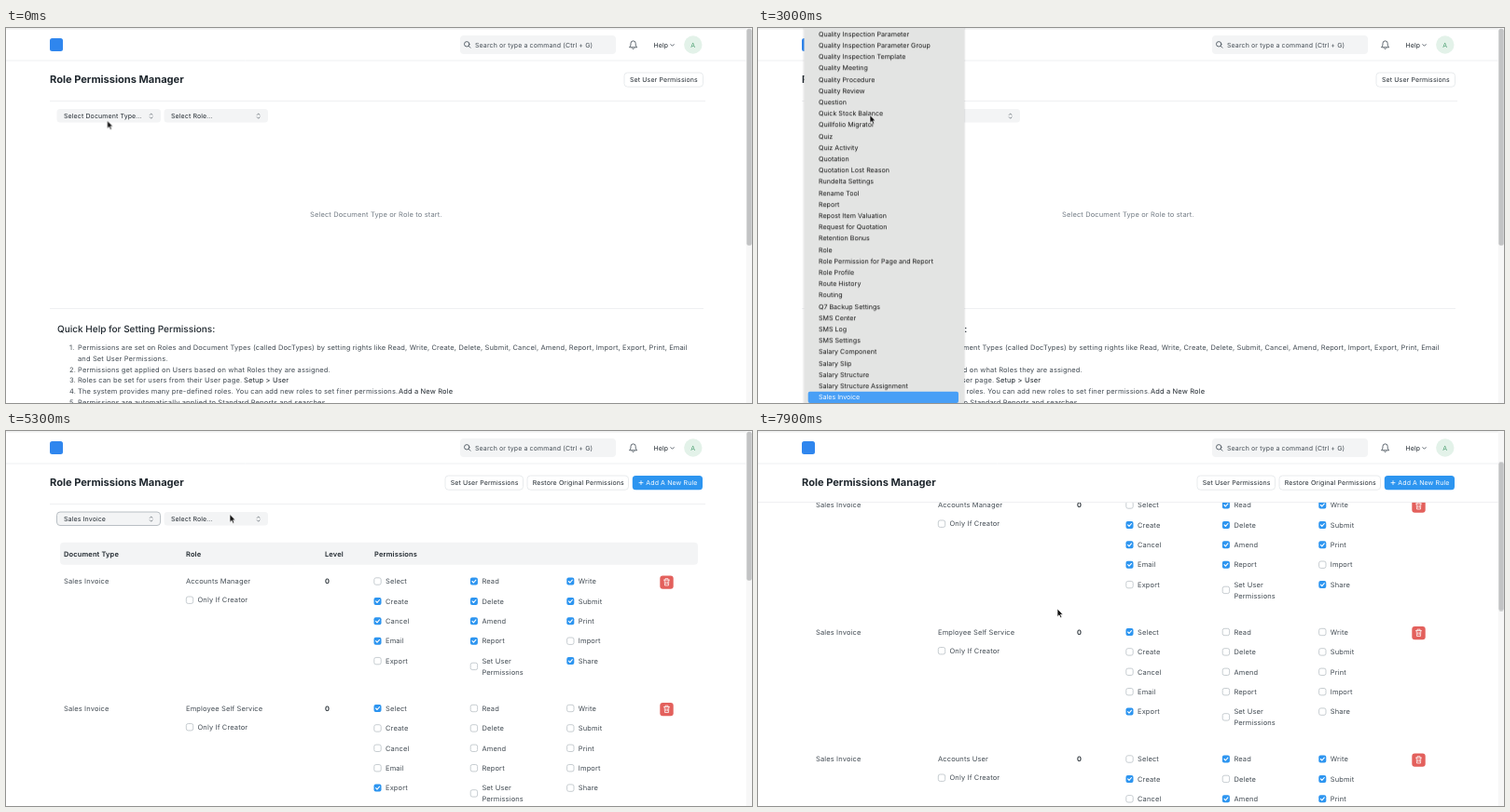
These frames come from a looping animation (800x403 px, 8000 ms). An HTML page:

```html
<!DOCTYPE html>
<html lang="en">
<head>
<meta charset="utf-8">
<title>Role Permissions Manager</title>
<style>
html, body { margin: 0; width: 100%; height: 100%; overflow: hidden; background: #fff; }
svg { display: block; width: 100vw; height: 100vh; }
text { font: 400 7.48px Inter, sans-serif; letter-spacing: .02em; fill: #424b53; text-rendering: geometricPrecision; white-space: pre; }
text.s { font-size: 6.96px; }
text.m { font-size: 7.11px; letter-spacing: 0; fill: #141414; }
text.dark { fill: #1f272e; }
text.bold { font-weight: 600; fill: #1f272e; }
text.title { font-size: 11.09px; font-weight: 700; letter-spacing: 0; fill: #1f272e; }
text.head { font-size: 10.03px; font-weight: 500; letter-spacing: 0; fill: #1f272e; }
text.soft { fill: #737c85; }
text.white { fill: #fff; }
text.faint { fill: #ececec; }
.line { fill: none; stroke: #4c565f; stroke-width: .9; stroke-linecap: round; stroke-linejoin: round; }
.thin { stroke-width: .7; }
.rule { stroke: #ebedef; stroke-width: .8; }
.btn { fill: #fff; stroke: #e3e6e9; stroke-width: .8; }
.btn.blue { fill: #2d95f0; stroke: none; }
.field { fill: #f3f4f5; }
.off { fill: #fff; stroke: #b9c0c6; stroke-width: .8; }
.on { fill: #2d95f0; }
.tick { fill: none; stroke: #fff; stroke-width: 1.1; stroke-linecap: round; stroke-linejoin: round; }

.before, .after, #menu, #top, #late, #pickA, #pickB, #ring, #key, #edge, #scroll, #thumb, #rows, #pointer {
  animation: 8s step-end infinite;
}
.before { animation-name: before; }
.after { animation-name: after; }
#menu { animation-name: menu; }
#top { animation-name: top; }
#late { animation-name: late; }
#rows { animation-name: rows; }
#pickA { animation-name: pickA; }
#pickB { animation-name: pickB; }
#edge { animation-name: edge; }
#ring { animation-name: ring; animation-timing-function: linear; }
#key { animation-name: key; animation-timing-function: linear; }
#scroll { animation-name: scroll; animation-timing-function: ease-out; }
#thumb { animation-name: thumb; animation-timing-function: ease-out; }
#pointer { animation-name: pointer; animation-timing-function: ease-in-out; }

@keyframes before { 0% { opacity: 1 } 57.5%, 100% { opacity: 0 } }
@keyframes after { 0% { opacity: 0 } 57.5%, 100% { opacity: 1 } }
@keyframes menu { 0% { opacity: 0 } 10% { opacity: 1 } 52.5%, 100% { opacity: 0 } }
@keyframes top { 0% { opacity: 1 } 23.75%, 100% { opacity: 0 } }
@keyframes late { 0% { opacity: 0 } 23.75%, 100% { opacity: 1 } }
@keyframes rows { 0% { transform: none } 32.5%, 100% { transform: translateY(-48.8px) } }
@keyframes pickA { 0% { opacity: 1 } 32.5%, 100% { opacity: 0 } }
@keyframes pickB { 0% { opacity: 0 } 32.5%, 100% { opacity: 1 } }
@keyframes edge { 0% { opacity: 0 } 75.5%, 100% { opacity: 1 } }
@keyframes ring { 0%, 8.7% { opacity: 0 } 9%, 10.5% { opacity: 1 } 13%, 100% { opacity: 0 } }
@keyframes key { 0%, 49.9% { opacity: 0 } 50.5%, 54% { opacity: 1 } 57%, 100% { opacity: 0 } }
@keyframes scroll {
  0%, 75% { transform: none }
  83.75% { transform: translateY(-75.5px) }
  88.75%, 100% { transform: translateY(-82px) }
}
@keyframes thumb {
  0%, 75% { transform: none }
  83.75% { transform: translateY(30px) }
  88.75%, 100% { transform: translateY(32.5px) }
}
@keyframes pointer {
  0% { transform: translate(108.5px, 99.5px) }
  5%, 55% { transform: translate(120px, 93.5px) }
  62.5%, 67.5% { transform: translate(240px, 89.5px) }
  73.75%, 100% { transform: translate(321px, 191px) }
}
</style>
</head>
<body>
<svg id="stage" viewBox="0 0 800 403" xmlns="http://www.w3.org/2000/svg"></svg>
<script>
// y is the vertical middle of the capitals
const text = (x, y, s, cls = '') =>
  `<text x="${x}" y="${y}" dy=".363em" class="${cls}">${s.replace(/>/g, '&gt;')}</text>`;
const rect = (x, y, w, h, r, attrs = '') =>
  `<rect x="${x}" y="${y}" width="${w}" height="${h}" rx="${r}" ${attrs}/>`;
const path = (d, cls = 'line', attrs = '') => `<path d="${d}" class="${cls}" ${attrs}/>`;
const group = (id, ...parts) => `<g id="${id}">${parts.join('')}</g>`;
const phase = (cls, ...parts) => `<g class="${cls}">${parts.join('')}</g>`;
const hline = (y, x1, x2) => path(`M${x1} ${y}H${x2}`, 'rule');

const button = (x, w, label, tx) =>
  rect(x, 48, w, 15.2, 3.5, 'class="btn"') + text(tx, 55.5, label, 's dark');

const select = (x, w, label, focus = '') =>
  rect(x, 87, w, 14.5, 3.5, `class="field" ${focus}`) + text(x + 7.5, 94.7, label, 's dark') +
  path(`M${x + 99.8} 93.4l1.4-1.4 1.4 1.4m0 2.4l-1.4 1.4-1.4-1.4`, 'line thin');

const check = (x, y, on) => on
  ? rect(x - 4, y - 4, 8, 8, 2, 'class="on"') + path(`M${x - 1.9} ${y}l1.4 1.5 2.5-2.9`, 'tick')
  : rect(x - 3.7, y - 3.7, 7.4, 7.4, 2, 'class="off"');

const rights = ['Select', 'Read', 'Write', 'Create', 'Delete', 'Submit', 'Cancel', 'Amend', 'Print',
  'Email', 'Report', 'Import', 'Export', 'Set User|Permissions', 'Share'];

function permission(role, bits, i) {
  const y = 161.5 + i * 136.5;
  const cells = rights.map((name, k) => {
    const x = 398.5 + (k % 3) * 103.4, cy = y + Math.floor(k / 3) * 21.4;
    const lines = name.split('|');
    return check(x, cy + (lines.length - 1) * 5.8, bits[k] === '1') +
      lines.map((s, n) => text(x + 8.5, cy + n * 11.7, s)).join('');
  });
  const bin = rect(701.3, y - 6, 14.4, 14.2, 3, 'fill="#e3605c"') +
    path(`M705.5 ${y - 1.4}h6M707 ${y - 1.6}v-1.2h3v1.2M706.2 ${y - 1.2}l.3 5.7h4l.3-5.7M707.8 ${y + .6}v2.2M709.3 ${y + .6}v2.2`,
      'tick', 'style="stroke-width:.75"');
  return text(62, y, 'Sales Invoice') + text(193, y, role) + text(342, y, '0', 'bold') +
    check(197, y + 20.2, false) + text(205.5, y + 20.2, 'Only If Creator') + cells.join('') + bin;
}

const help = ['Permissions are set on Roles and Document Types (called DocTypes) by setting rights like Read, Write, Create, Delete, Submit, Cancel, Amend, Report, Import, Export, Print, Email',
  'and Set User Permissions.',
  'Permissions get applied on Users based on what Roles they are assigned.',
  'Roles can be set for users from their User page.',
  'The system provides many pre-defined roles. You can add new roles to set finer permissions.',
  'Permissions are automatically applied to Standard Reports and searches.'];
const helpY = i => 343.5 + i * 11.7;

const firstItems = ['About Us Settings', 'Access Log', 'Account', 'Accounting Dimension',
  'Accounting Dimension Filter', 'Accounting Period', 'Accounts Settings', 'Activity Cost', 'Activity Log',
  'Activity Type', 'Additional Salary', 'Address', 'Address Template', 'Aldrune KTS Settings', 'Appointment',
  'Appointment Booking Settings', 'Appointment Letter', 'Appointment Letter Template', 'Appraisal',
  'Appraisal Template', 'Article', 'Asset', 'Asset Category', 'Asset Maintenance', 'Asset Maintenance Log'];
const lateItems = ['Quality Feedback', 'Quality Feedback Template', 'Quality Goal', 'Quality Inspection',
  'Quality Inspection Parameter', 'Quality Inspection Parameter Group', 'Quality Inspection Template',
  'Quality Meeting', 'Quality Procedure', 'Quality Review', 'Question', 'Quick Stock Balance',
  'Quillfolio Migrator', 'Quiz', 'Quiz Activity', 'Quotation', 'Quotation Lost Reason', 'Rundelta Settings',
  'Rename Tool', 'Report', 'Repost Item Valuation', 'Request for Quotation', 'Retention Bonus', 'Role',
  'Role Permission for Page and Report', 'Role Profile', 'Route History', 'Routing', 'Q7 Backup Settings',
  'SMS Center', 'SMS Log', 'SMS Settings', 'Salary Component', 'Salary Slip', 'Salary Structure',
  'Salary Structure Assignment', 'Sales Invoice'];
const items = (list, y) => list.map((s, i) => text(65, y + i * 12.2, s, 'm')).join('');
const picked = s => rect(53.7, 390.8, 161.3, 12.2, 2, 'fill="#489ff6"') + text(65, 396.9, s, 'm white');
const panel = (y, h) => rect(49.5, y, 171.5, h, 4, 'fill="#e3e4e3" filter="url(#shade)"');

const defs = `<defs>
  <filter id="shade" x="-10%" y="-10%" width="120%" height="120%"><feDropShadow dx="0" dy="1" stdDeviation="1.2" flood-opacity=".22"/></filter>
</defs>`;

const before = phase('before',
  select(54.5, 111.5, 'Select Document Type...'),
  text(326, 200.5, 'Select Document Type or Role to start.', 'soft'),
  hline(301.5, 47, 748),
  text(55, 323.5, 'Quick Help for Setting Permissions:', 'head'),
  help.map((s, i) => text(77, helpY(i), s)).join(''),
  [0, 2, 3, 4, 5].map((row, i) => text(68, helpY(row), `${i + 1}.`)).join(''),
  text(255, helpY(3), 'Setup > User', 'dark'),
  text(421, helpY(4), 'Add a New Role', 'dark'));

const table = phase('after',
  select(54.5, 111, 'Sales Invoice', 'stroke="#a9b0b6" stroke-width=".8"'),
  rect(58, 119.8, 684, 24, 4, 'class="field"'),
  [[62, 'Document Type'], [193, 'Role'], [342, 'Level'], [395, 'Permissions']]
    .map(([x, s]) => text(x, 131.8, s, 'bold')).join(''),
  permission('Accounts Manager', '011111111110001', 0),
  permission('Employee Self Service', '100000000000100', 1),
  permission('Accounts User', '011101011110001', 2));

const nav = rect(0, 0, 794, 76.5, 0, 'fill="#fff"') +
  rect(0, 0, 794, 1.6, 0, 'fill="#f0f1f1"') + hline(35, 0, 794) +
  rect(47, 11, 14, 14, 2.5, 'fill="#2f86ee"') +
  rect(487, 8, 167, 20, 4, 'class="field"') +
  '<circle cx="494.2" cy="17.3" r="2.7" class="line"/>' + path('M496.2 19.4l1.8 1.8') +
  text(503, 18, 'Search or type a command (Ctrl + G)', 's') +
  path('M668.8 20.5c1-1 1.2-2 1.2-4a2.6 2.6 0 0 1 5.2 0c0 2 .2 3 1.2 4zM671.5 21.8a1.2 1.2 0 0 0 2.2 0') +
  text(694.5, 18, 'Help', 's dark') + path('M712.8 17.6l1.7 1.7 1.7-1.7') +
  '<circle cx="736.8" cy="18" r="9.7" fill="#e3f2e9"/>' + text(734.2, 18, 'A', 's" style="fill:#4fa074') +
  text(47, 55.2, 'Role Permissions Manager', 'title') +
  group('edge', hline(76.5, 0, 794));

const actions = phase('before', button(663, 84.5, 'Set User Permissions', 669)) +
  phase('after',
    button(471, 83.5, 'Set User Permissions', 476.7),
    button(559, 108.5, 'Restore Original Permissions', 564.8),
    rect(671.8, 48, 75.2, 15.2, 3.5, 'class="btn blue"'),
    path('M679 55.6h4M681 53.6v4', 'tick', 'style="stroke-width:.8"'),
    text(686.3, 55.5, 'Add A New Rule', 's white'));

const thumb = h => rect(794.3, .7, 5.4, h, 2.5, 'fill="#c2c3c4"');
const bar = rect(793.7, 0, 6.3, 403, 0, 'fill="#f7f7f7"') +
  phase('before', thumb(233)) + phase('after', group('thumb', thumb(160)));

const menu = group('menu',
  group('top', panel(84.5, 330),
    rect(51.5, 88.7, 166, 12, 2, 'fill="#c0c1c0"'),
    path('M57 95l1.6 1.9 3-4.3', 'line', 'style="stroke:#222;stroke-width:1.1"'),
    text(65, 94.7, 'Select Document Type...', 'm faint'),
    items(firstItems, 106.9)),
  group('late', panel(-10, 425),
    group('rows', items(lateItems, 6.5)),
    group('pickA', picked('Salary Component')),
    group('pickB', picked('Sales Invoice'))));

const enterKey = group('key',
  rect(372.7, 320, 55.6, 41, 8, 'fill="#454545"'),
  path('M402.5 332.3h4.9a3 3 0 0 1 3 3v4.4a3 3 0 0 1-3 3H391M396.8 337l-5.9 5.7 5.9 5.7', 'tick', 'style="stroke-width:2.6"'));

const pointer = group('pointer',
  path('M0 0V8.6L2 6.8 3.4 9.8 4.9 9.1 3.5 6.2H6.1Z', '', 'fill="#111" stroke="#fff" stroke-width=".7"'));

document.getElementById('stage').innerHTML = defs + rect(0, 0, 800, 403, 0, 'fill="#fff"') +
  group('scroll', hline(78.5, 47, 750), select(169.5, 111.5, 'Select Role...'), before, table) +
  nav + actions + bar + menu + enterKey +
  '<circle id="ring" cx="120.3" cy="94.8" r="11.6" fill="none" stroke="#86a4d2" stroke-width="1.6"/>' + pointer;
</script>
</body>
</html>
```
